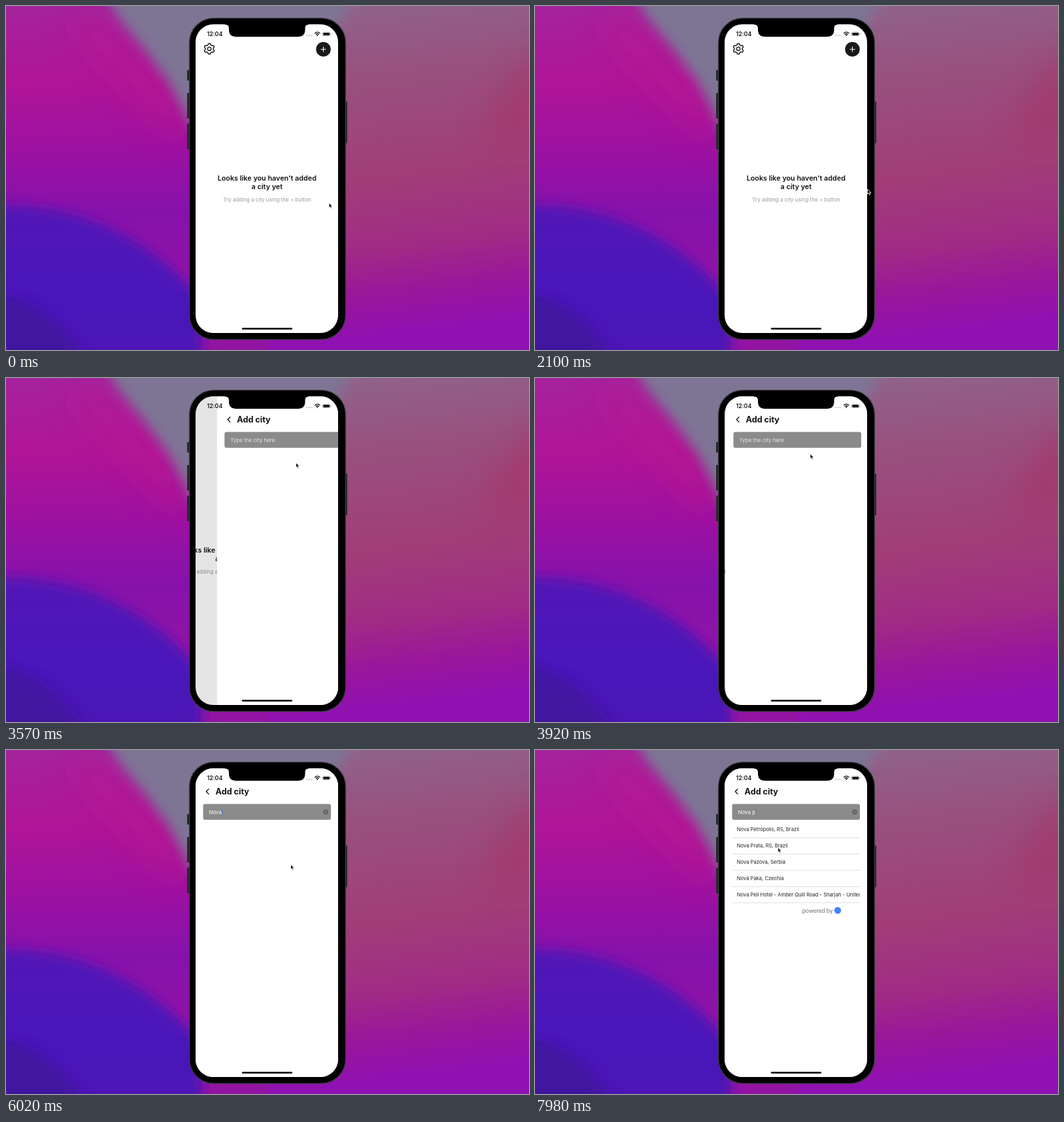
An HTML page for the animation above (8000 ms loop, 800 px wide and 526 px high).

```html
<!DOCTYPE html>
<html lang="en">
<head>
<meta charset="utf-8">
<title>Add city</title>
<style>
  html, body { margin: 0; width: 100%; height: 100%; overflow: hidden; background: #8a1aa0; }
  svg { display: block; width: 100vw; height: 100vh; }
  text { font-family: Inter, "Open Sans", sans-serif; white-space: pre; }
  .line { fill: none; stroke: #111; stroke-linecap: round; stroke-linejoin: round; }
</style>
</head>
<body>
<svg viewBox="0 0 800 526">
  <defs>
    <linearGradient id="left" x2="0" y2="1">
      <stop stop-color="#a5239c"/>
      <stop offset=".22" stop-color="#b01597"/>
      <stop offset=".42" stop-color="#9c11a2"/>
      <stop offset=".6" stop-color="#8612ab"/>
      <stop offset=".85" stop-color="#9414a4"/>
    </linearGradient>
    <linearGradient id="right" gradientUnits="userSpaceOnUse" x1="560" y1="0" x2="620" y2="526">
      <stop stop-color="#90628a"/>
      <stop offset=".2" stop-color="#98517f"/>
      <stop offset=".5" stop-color="#a13d78"/>
      <stop offset=".7" stop-color="#a02b85"/>
      <stop offset=".83" stop-color="#9a169b"/>
      <stop offset=".95" stop-color="#9011b2"/>
    </linearGradient>
    <linearGradient id="blue" x2="0" y2="1">
      <stop stop-color="#5212b6"/>
      <stop offset=".5" stop-color="#4a14ba"/>
      <stop offset="1" stop-color="#4c14b0"/>
    </linearGradient>
    <filter id="soft" x="-30%" y="-30%" width="160%" height="160%"><feGaussianBlur stdDeviation="9"/></filter>
    <filter id="softer" x="-50%" y="-50%" width="200%" height="200%"><feGaussianBlur stdDeviation="22"/></filter>
    <clipPath id="screen"><rect x="290" y="28" width="218" height="472" rx="27"/></clipPath>
    <clipPath id="rowClip"><rect x="302" y="108" width="195" height="150"/></clipPath>
  </defs>

  <!-- wallpaper -->
  <rect width="400" height="526" fill="url(#left)"/>
  <rect x="400" width="400" height="526" fill="url(#right)"/>
  <path d="M110 20L180 90L270 190" fill="none" stroke="#b9188e" stroke-width="50" opacity=".5" filter="url(#softer)"/>
  <path d="M135-50L170 15L215 70L250 118L290 195H420L550-50Z" fill="#7e7495" filter="url(#soft)"/>
  <ellipse cx="805" cy="140" rx="90" ry="45" transform="rotate(-50 805 140)" fill="#a43468" opacity=".6" filter="url(#softer)"/>
  <path d="M-50 305Q60 300 130 328Q225 360 300 450V590H-50Z" fill="url(#blue)" filter="url(#soft)"/>
  <path d="M-50 435Q30 440 75 485T150 590H-50Z" fill="#41159a" opacity=".8" filter="url(#soft)"/>

  <!-- handset -->
  <g fill="#25272a">
    <rect x="277" y="98" width="5" height="16" rx="1"/>
    <rect x="277" y="133" width="5" height="39" rx="1"/>
    <rect x="277" y="180" width="5" height="39" rx="1"/>
    <rect x="517" y="146" width="5" height="64" rx="1"/>
  </g>
  <rect x="280.6" y="18.6" width="238.8" height="491.3" rx="37" stroke="#3a3d3e" stroke-width="1.4"/>

  <g clip-path="url(#screen)">
    <rect x="290" y="28" width="218" height="472" fill="#fff"/>
    <g id="home">
      <path id="gear" class="line" stroke-width="1.4"/>
      <circle class="line" cx="311" cy="65.5" r="2.7" stroke-width="1.3"/>
      <circle cx="485.5" cy="66.2" r="11.2" fill="#1a1a1c"/>
      <path d="M481.5 66.2h8M485.5 62.2v8" stroke="#fff" stroke-width="1.1"/>
      <g text-anchor="middle">
        <g font-size="10.8" font-weight="600" fill="#111">
          <text x="399.3" y="267.4">Looks like you haven't added</text>
          <text x="399.3" y="280.4">a city yet</text>
        </g>
        <text x="399.5" y="299.2" font-size="8" fill="#999">Try adding a city using the + button</text>
      </g>
    </g>
    <rect id="dim" x="290" y="28" width="218" height="472"/>
    <g id="add">
      <rect x="290" y="28" width="218" height="472" fill="#fff"/>
      <path class="line" d="M310 59.8L306.3 63.5L310 67.2" stroke-width="1.3"/>
      <text x="320.6" y="68" font-size="12.6" font-weight="700" fill="#111">Add city</text>
      <rect x="301.5" y="82.5" width="195.5" height="24.3" rx="3" fill="#8b8b8b"/>
      <text id="field" x="310.4" y="97.5" font-size="8"></text>
      <rect id="caret" y="90.2" width="1" height="9.2" fill="#4b6ff0"/>
      <g id="clear">
        <circle cx="489" cy="94.7" r="4" fill="#666"/>
        <path d="M487.6 93.3l2.8 2.8m0-2.8l-2.8 2.8" stroke="#8b8b8b" stroke-width=".8"/>
      </g>
      <g id="list">
        <g id="rows" clip-path="url(#rowClip)" font-size="7.6" fill="#222"></g>
        <text x="408.8" y="248.6" font-size="9" fill="#707070" style="font-family:Lato,sans-serif">powered by</text>
        <circle cx="463" cy="245.3" r="5.2" fill="#4285f4"/>
      </g>
    </g>

    <!-- status bar -->
    <text x="307.6" y="46" font-size="8.8" font-weight="600" fill="#111">12:04</text>
    <path d="M459.5 45.2h9" stroke="#aaa" stroke-width="1.2" stroke-dasharray="1.5 1"/>
    <path class="line" d="M472.6 41.6Q476.3 38.2 480 41.6M474.2 43.4Q476.3 41.6 478.4 43.4" stroke-width="1.3"/>
    <circle cx="476.3" cy="45" r="1" fill="#111"/>
    <rect x="484.4" y="40" width="11.4" height="5.6" rx="1.6" fill="none" stroke="#888" stroke-width=".7"/>
    <rect x="485.3" y="40.9" width="9.6" height="3.8" rx=".9" fill="#111"/>
    <path d="M497 41.8v2" stroke="#888" stroke-width=".9"/>
    <rect x="360.8" y="492" width="77.2" height="2.7" rx="1.35" fill="#111"/>
    <path d="M335 27H463V28.6Q457.5 28.6 457.5 34V36Q457.5 47 446.5 47H352Q341 47 341 36V34Q341 28.6 335 28.6Z"/>
  </g>

  <path id="cursor" d="M0 0V7.6L1.8 6L3.1 8.8L4.5 8.2L3.2 5.5H5.5Z" fill="#111" stroke="#fff" stroke-width=".8"/>
</svg>

<script>
const $ = id => document.getElementById(id);
const LOOP = 8000, WIDTH = 218, PUSH = 3220;
const FOCUS = 4900, RESULTS = 7350;
const typed = [[5380, 'N'], [5530, 'No'], [5690, 'Nov'], [5850, 'Nova'], [6600, 'Nova '], [7000, 'Nova p']];
// time, x, y of the pointer tip
const path = [
  [0, 494, 301], [1050, 510.5, 286], [2100, 508.5, 280], [2850, 485, 68], [3220, 485, 68],
  [3570, 443.5, 129.5], [4350, 390.5, 98], [4950, 390.5, 98], [5600, 435.5, 175],
  [6300, 435.5, 175], [7600, 371.5, 149], [8000, 371.5, 149]
];
const places = [
  'Nova Petrópolis, RS, Brazil', 'Nova Prata, RS, Brazil', 'Nova Pazova, Serbia',
  'Nová Paka, Czechia', 'Nova Pell Hotel - Amber Quill Road - Sharjah - United'
];

$('rows').innerHTML = places.map((name, i) => {
  const y = 124.4 + i * 24.8;
  return `<text x="308.8" y="${y}">${name}</text><path d="M302 ${y + 10}H497" stroke="#d2d2d2" stroke-width=".7"/>`;
}).join('');

$('gear').setAttribute('d', 'M' + Array.from({ length: 72 }, (_, i) => {
  const a = i * Math.PI / 36;
  const r = 7.1 + Math.max(-1, Math.min(1, 1.7 * Math.cos(6 * a)));
  return `${311 + r * Math.sin(a)} ${65.5 - r * Math.cos(a)}`;
}).join('L') + 'Z');

const show = (id, on) => $(id).setAttribute('visibility', on ? 'inherit' : 'hidden');
const move = (id, x, y = 0) => $(id).setAttribute('transform', `translate(${x} ${y})`);

function pointer(t) {
  const i = path.findIndex(p => p[0] > t);
  const [t0, x0, y0] = path[i - 1], [t1, x1, y1] = path[i];
  const u = (t - t0) / (t1 - t0), e = u * u * (3 - 2 * u);
  return [x0 + (x1 - x0) * e, y0 + (y1 - y0) * e];
}

let shown;
function draw(t) {
  // critically damped slide
  const s = Math.max(0, t - PUSH) * 0.0096;
  const rest = t > PUSH + 1000 ? 0 : (1 + s) * Math.exp(-s);
  move('add', WIDTH * rest);
  move('home', -0.3 * WIDTH * (1 - rest));
  $('dim').setAttribute('opacity', 0.12 * (1 - rest));

  const text = typed.reduce((last, [at, str]) => t >= at ? str : last, '');
  const field = $('field');
  if (text !== shown) {
    field.textContent = text || 'Type the city here';
    field.setAttribute('fill', text ? '#fff' : '#e8e8e8');
    shown = text;
  }
  $('caret').setAttribute('x', 310.4 + (text ? field.getComputedTextLength() : 0));
  const lastKey = typed.reduce((last, [at]) => t >= at ? at : last, FOCUS);
  show('caret', t >= FOCUS && (t - lastKey) % 1000 < 500 || t > 7900);
  show('clear', text);
  show('list', t >= RESULTS);
  move('cursor', ...pointer(t));
}

function tick() {
  draw(performance.now() % LOOP);
  requestAnimationFrame(tick);
}
tick();
</script>
</body>
</html>
```
